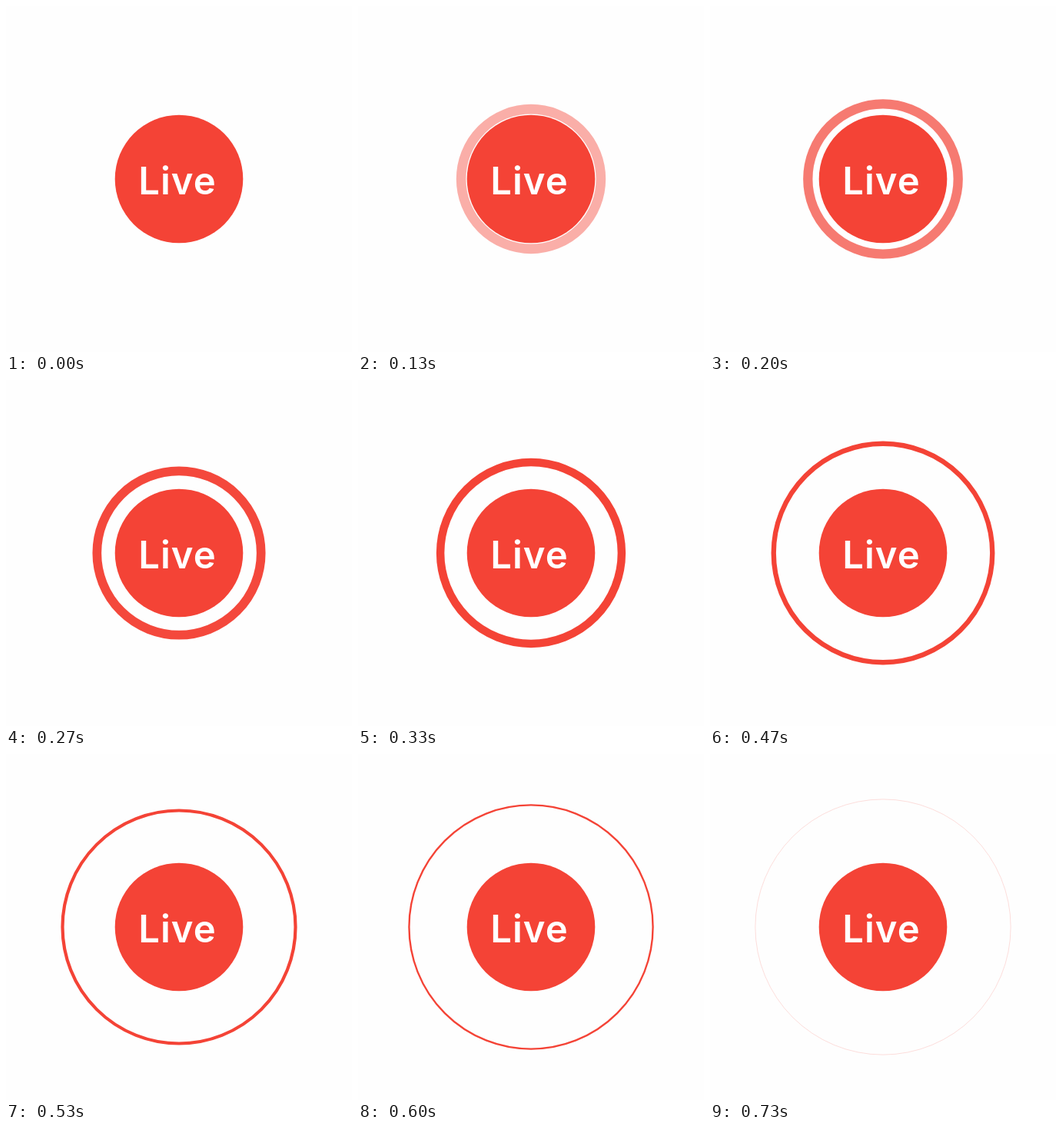
These frames come from a looping animation (450x450 px, 790 ms). An HTML page:

```html
<!DOCTYPE html>
<html lang="en">
<head>
<meta charset="utf-8">
<title>Live</title>
<style>
  html, body { margin: 0; height: 100%; overflow: hidden; background: #fefefe; }
  svg { display: block; width: 100%; height: 100%; }
  text { font: 600 49px Inter, sans-serif; letter-spacing: 1px; fill: #fff; }
</style>
</head>
<body>
<svg viewBox="0 0 450 450">
  <circle id="ring" cx="225" cy="225" fill="none" stroke="#f44336"/>
  <circle cx="225" cy="225" r="83.3" fill="#f44336"/>
  <text x="172.3" y="244.7">Live</text>
</svg>
<script>
  const LOOP = 790;
  const ring = document.getElementById('ring');

  const easeInOut = p => p < 0.5 ? 2 * p * p : 1 - 2 * (1 - p) ** 2;
  const clamp = v => Math.min(1, Math.max(0, v));

  // Three held steps every 200 ms, twelve per loop
  function stepAt(t) {
    const rest = t % 200;
    return 3 * Math.floor(t / 200) + (rest >= 70) + (rest >= 130);
  }

  function draw() {
    const p = 0.05 + 0.081 * stepAt(performance.now() % LOOP);
    const grow = easeInOut(p);
    const radius = 83.4 + 83.3 * grow;
    ring.setAttribute('r', radius);
    ring.setAttribute('stroke-width', 0.152 * (1 - grow) * radius);
    ring.setAttribute('opacity', clamp((p - 0.083) * 3.33));
    requestAnimationFrame(draw);
  }
  draw();
</script>
</body>
</html>
```
